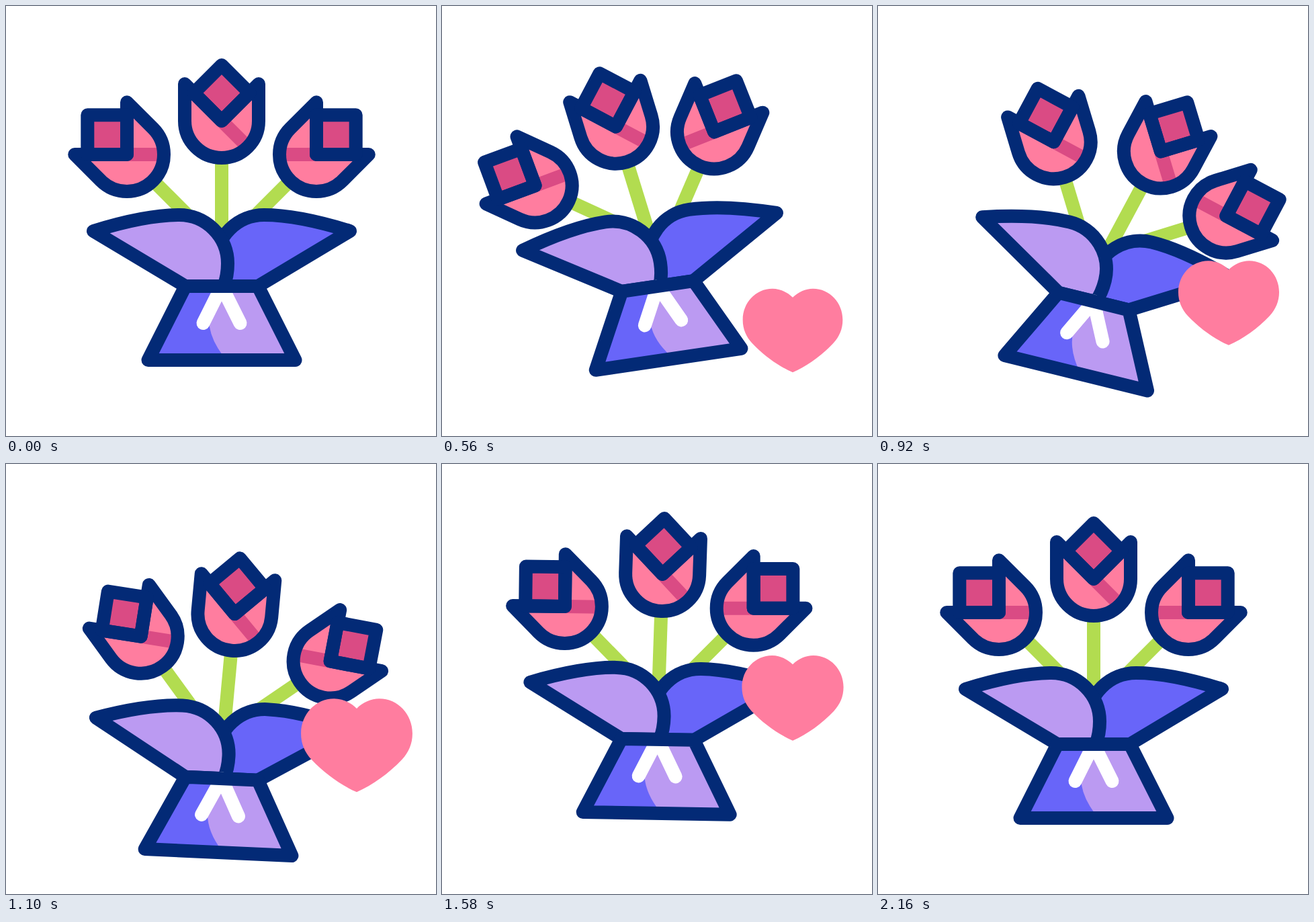
An HTML page that plays this animation: 640 by 640 pixels, repeating every 2.4 s.

```html
<!DOCTYPE html>
<html lang="en">
<head>
<meta charset="utf-8">
<title>Bouquet</title>
<style>
  html, body { margin: 0; width: 100%; height: 100%; overflow: hidden; background: #fff; }
  svg { display: block; width: 100vw; height: 100vh; }
  .line { fill: none; stroke: #032a76; stroke-width: 20; stroke-linecap: round; stroke-linejoin: round; }
  .stem { fill: none; stroke: #b2dc50; stroke-width: 20; }
  .stripe { stroke: #da4b84; stroke-width: 20; }
  .ribbon { fill: none; stroke: #fff; stroke-width: 20; stroke-linecap: round; stroke-linejoin: round; }
  .pink { fill: #ff7d9f; }
  .rose { fill: #da4b84; }
  .lilac { fill: #bb9af2; }
  .blue { fill: #6865f9; }
</style>
</head>
<body>
<svg viewBox="0 0 640 640">
  <defs>
    <!-- flower head, origin at the centre of its round base -->
    <g id="head">
      <path class="pink" d="M-55-55V0A55 55 0 0 0 55 0V-55L0 0Z"/>
      <path class="stripe" d="M0 0L39 39"/>
      <path class="rose" d="M0-83L41.5-41.5L0 0L-41.5-41.5Z"/>
      <path class="line" d="M-55-55V0A55 55 0 0 0 55 0V-55L0 0Z"/>
      <path class="line" d="M0-83L41.5-41.5L0 0L-41.5-41.5Z"/>
    </g>
    <path id="leaf" d="M130 335C175 321 220 311 258 311A72 72 0 0 1 330 383Q330 402 324 417H267Z"/>
    <path id="pot" d="M267 417H375L430.5 527H211.5Z"/>
  </defs>

  <g id="bouquet">
    <g id="left">
      <path class="stem" d="M180 221L290 331"/>
      <use href="#head" transform="translate(180 221) rotate(-45)"/>
    </g>
    <g id="right">
      <path class="stem" d="M462 221L352 331"/>
      <use href="#head" transform="translate(462 221) rotate(45) scale(-1 1)"/>
    </g>
    <g id="middle">
      <path class="stem" d="M321 171V375"/>
      <use href="#head" transform="translate(321 171)"/>
    </g>
    <g transform="matrix(-1 0 0 1 642 0)">
      <use href="#leaf" class="blue"/>
      <use href="#leaf" class="line"/>
    </g>
    <use href="#leaf" class="lilac"/>
    <use href="#leaf" class="line"/>
    <use href="#pot" class="blue"/>
    <path class="lilac" d="M321 417Q281 470 326 524L430 527L375 417Z"/>
    <path class="ribbon" d="M293.5 472L321 417L348.5 472"/>
    <use href="#pot" class="line"/>
  </g>

  <path id="heart" class="pink" d="M0-49C-8-57-19-62-30-62C-55-62-74-41-74-16C-74-2-69 9-60 19C-43 37-21 53 0 62C21 53 43 37 60 19C69 9 74-2 74-16C74-41 55-62 30-62C19-62 8-57 0-49Z"/>
</svg>
<script>
const LOOP = 2400, STEP = 20;

// Swings with sine easing from one turning point [time, value] to the next.
function swing(...turns) {
  return t => {
    const next = turns.findIndex(([time]) => time > t);
    if (next === 0) return turns[0][1];
    if (next < 0) return turns[turns.length - 1][1];
    const [t0, v0] = turns[next - 1], [t1, v1] = turns[next];
    return v0 + (v1 - v0) * (1 - Math.cos(Math.PI * (t - t0) / (t1 - t0))) / 2;
  };
}

const tilt = swing([0, 0], [389, -16], [898, 14], [1275, -6.5], [1694, 2.5], [2110, 0]);
const drop = swing([0, 0], [391, 57], [697, -41], [1060, 53], [1450, -18], [1816, 21], [2150, 0]);
const beat = swing([300, 0], [545, 149], [780, 118], [1030, 172], [1370, 111], [1710, 170], [2080, 0]);

// The heart rises, slowly gaining speed.
function rise(t) {
  const s = (t - 560) / 1000;
  return 483 - 104 * s - 27.5 * s * s;
}

// Flowers sway further than the bouquet, the side ones a little later.
const flowers = [
  { id: "left", x: 273, y: 316, lag: 42 },
  { id: "middle", x: 321, y: 347, lag: 0 },
  { id: "right", x: 369, y: 316, lag: 63 }
];

const place = (id, value) => document.getElementById(id).setAttribute("transform", value);

function draw(t) {
  place("bouquet", `translate(0 ${drop(t)}) rotate(${tilt(t)} 321 417)`);
  for (const { id, x, y, lag } of flowers) {
    place(id, `rotate(${1.04 * tilt(t - lag)} ${x} ${y})`);
  }
  place("heart", `translate(522 ${rise(t)}) scale(${beat(t) / 148})`);
}

const start = performance.now();
function tick() {
  const t = (performance.now() - start) % LOOP;
  draw(Math.floor(t / STEP) * STEP);
  requestAnimationFrame(tick);
}
draw(0);
requestAnimationFrame(tick);
</script>
</body>
</html>
```
